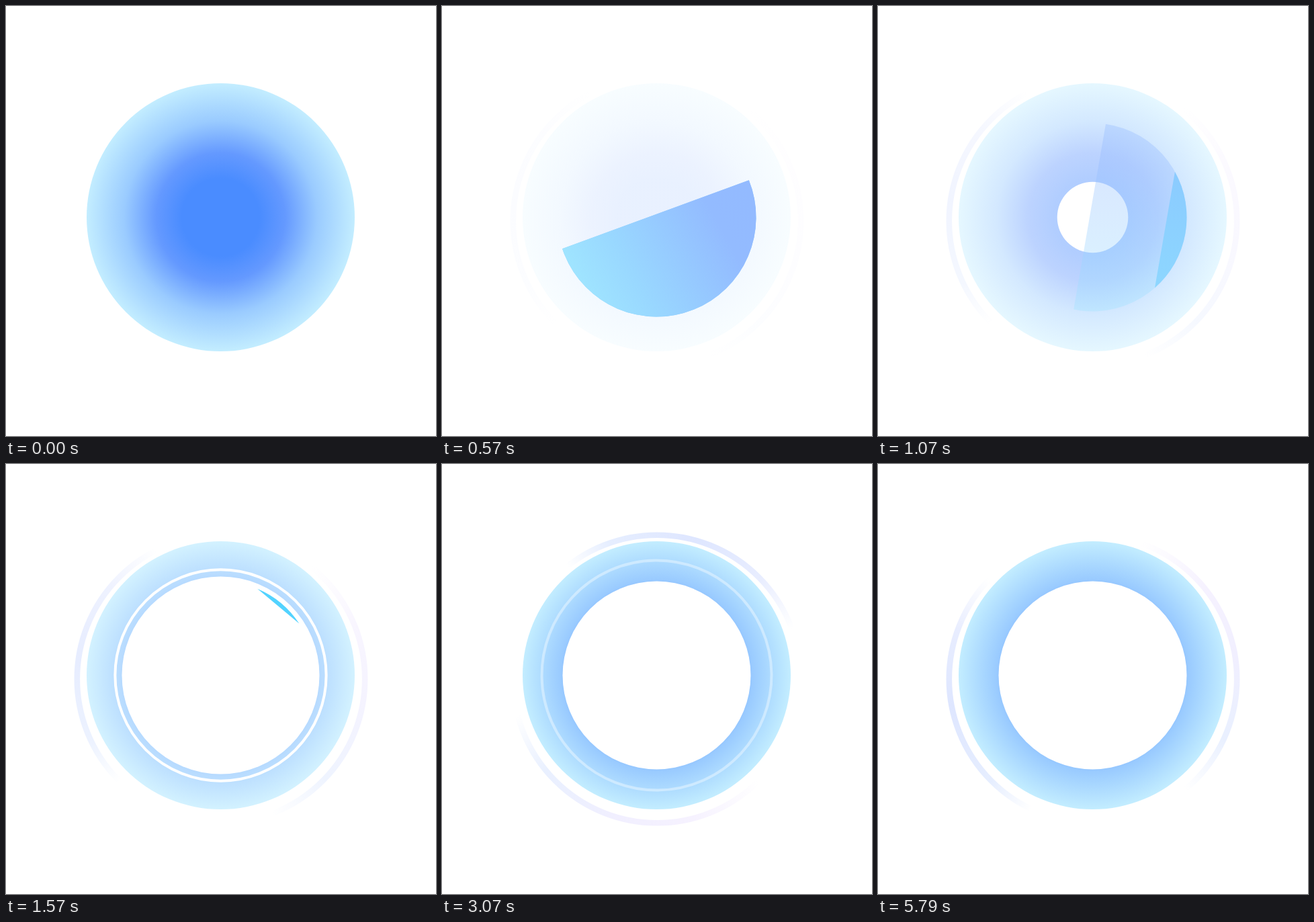
Write an HTML page with a canvas that moves like this. It is 640 px wide and 640 px high and loops after 6 s.

```html
<!DOCTYPE html>
<html lang="en">
<head>
<meta charset="utf-8">
<title>Orb</title>
<style>
  html, body { margin: 0; width: 100%; height: 100%; overflow: hidden; background: #fff; }
  canvas { display: block; width: 640px; height: 640px; }
</style>
</head>
<body>
<canvas id="stage" width="640" height="640"></canvas>
<script>
const ctx = document.getElementById('stage').getContext('2d');
const LOOP = 6000, FPS = 14;
const CX = 319.5, CY = 314.5;
const rad = deg => deg * Math.PI / 180;
const clamp = v => Math.min(1, Math.max(0, v));
const span = (t, a, b) => clamp((t - a) / (b - a));
const sine = u => 0.5 - 0.5 * Math.cos(Math.PI * u);

// Piecewise linear track: [time, value] pairs
function track(t, keys) {
  for (let i = 1; i < keys.length; i++) {
    const [t0, v0] = keys[i - 1], [t1, v1] = keys[i];
    if (t < t1) return v0 + (v1 - v0) * span(t, t0, t1);
  }
  return keys[keys.length - 1][1];
}

function withStops(gradient, stops) {
  for (const [at, color] of stops) gradient.addColorStop(at, color);
  return gradient;
}

const orbFill = withStops(ctx.createRadialGradient(CX, CY, 0, CX, CY, 199.5), [
  [0, '#4a8cff'], [0.29, '#4a8cff'], [0.48, '#6499ff'], [0.72, '#9acbff'], [1, '#c3edff']
]);

const haloStops = [
  [0, '#fff'], [19, '#e6eeff'], [54, '#dee6ff'], [84, '#e8edff'], [108, '#fff'],
  [174, '#fff'], [204, '#f6f2ff'], [234, '#f1efff'], [269, '#e9f0ff'], [294, '#fff'], [360, '#fff']
].map(([deg, color]) => [deg / 360, color]);

function disc(r, fill, alpha = 1) {
  if (r <= 0 || alpha <= 0) return;
  ctx.globalAlpha = alpha;
  ctx.fillStyle = fill;
  ctx.beginPath();
  ctx.arc(CX, CY, r, 0, 2 * Math.PI);
  ctx.fill();
}

function ring(x, y, r, width, stroke, alpha, from = 0, to = 360) {
  if (alpha <= 0 || to - from < 0.1) return;
  ctx.globalAlpha = alpha;
  ctx.strokeStyle = stroke;
  ctx.lineWidth = width;
  ctx.lineCap = 'round';
  ctx.beginPath();
  ctx.arc(x, y, r, rad(from), rad(to));
  ctx.stroke();
}

// Part of a disc lying beyond a chord at the given distance from the centre
function segment(r, dist, angle, fill, alpha) {
  if (alpha <= 0 || r <= Math.abs(dist)) return;
  const half = Math.acos(dist / r);
  ctx.save();
  ctx.translate(CX, CY);
  ctx.rotate(rad(angle));
  ctx.globalAlpha = alpha;
  ctx.fillStyle = fill;
  ctx.beginPath();
  ctx.arc(0, 0, r, Math.PI / 2 - half, Math.PI / 2 + half);
  ctx.fill();
  ctx.restore();
}

const liquidFill = withStops(ctx.createLinearGradient(-140, 45, 140, 0), [
  [0, '#9fe4ff'], [0.25, '#99d8ff'], [0.78, '#93bbff'], [1, '#93baff']
]);

function drawLiquid(t) {
  const angle = 48.4 - 0.12 * t;
  const r = track(t, [[0, 0], [350, 140], [450, 148], [600, 148], [950, 140], [2000, 140]]);
  const dist = track(t, [[0, -4.5], [620, -4.5], [1070, 109], [1570, 134], [1800, 141]]);
  const red = track(t, [[600, 150], [1070, 134], [1570, 82]]);
  const alpha = track(t, [[0, 0], [350, 1], [570, 1], [1070, 0.36], [1350, 0]]);
  segment(r, dist, angle, `rgb(${red}, 211, 255)`, track(t, [[0, 0], [350, 1]]));
  segment(r, -4.5, angle, liquidFill, alpha);
}

function drawHalo(t, alpha) {
  const turn = 189 + 360 * span(t, 2000, LOOP);
  const paint = withStops(ctx.createConicGradient(rad(turn - 54), 320, 320), haloStops);
  ring(320, 320, 214.2, 8.6, paint, alpha);
}

function drawHighlight(t) {
  const on = sine(span(t, 1570, 2340));
  const off = sine(span(t, 3130, 4600));
  const alpha = track(t, [[1600, 0], [2210, 0.23], [3400, 0.45]]);
  ring(CX, CY, 171, 4, '#fff', alpha, 291 - 360 * on, 291 - 360 * off);
}

function draw(t) {
  ctx.globalAlpha = 1;
  ctx.fillStyle = '#fff';
  ctx.fillRect(0, 0, 640, 640);

  const appear = span(t, 370, 2000);
  drawHalo(t, appear);
  disc(199.5, orbFill, 1 - span(t, 0, 500));
  disc(199.5, orbFill, appear);
  disc(track(t, [[800, 0], [1070, 52.5], [1500, 142], [1570, 147], [1660, 147], [1930, 140]]), '#fff');

  if (t >= 1400 && t < 2000) {
    const r = track(t, [[1400, 130], [1570, 157], [1720, 171]]);
    ring(CX, CY, r, 4, '#fff', 1 - span(t, 1600, 1980));
  }
  if (t < 2000) drawLiquid(t);
  drawHighlight(t);
}

// Stepped clock with longer holds in the quiet stretches
function stepped(ms) {
  let k = Math.floor((ms + 5) * FPS / 1000) % (LOOP * FPS / 1000);
  if (k >= 66) k -= k % 3;
  else if (k >= 28 && k <= 30) k = 28;
  return k * 1000 / FPS;
}

const start = performance.now();
function tick() {
  draw(stepped((performance.now() - start) % LOOP));
  requestAnimationFrame(tick);
}
draw(0);
requestAnimationFrame(tick);
</script>
</body>
</html>
```
